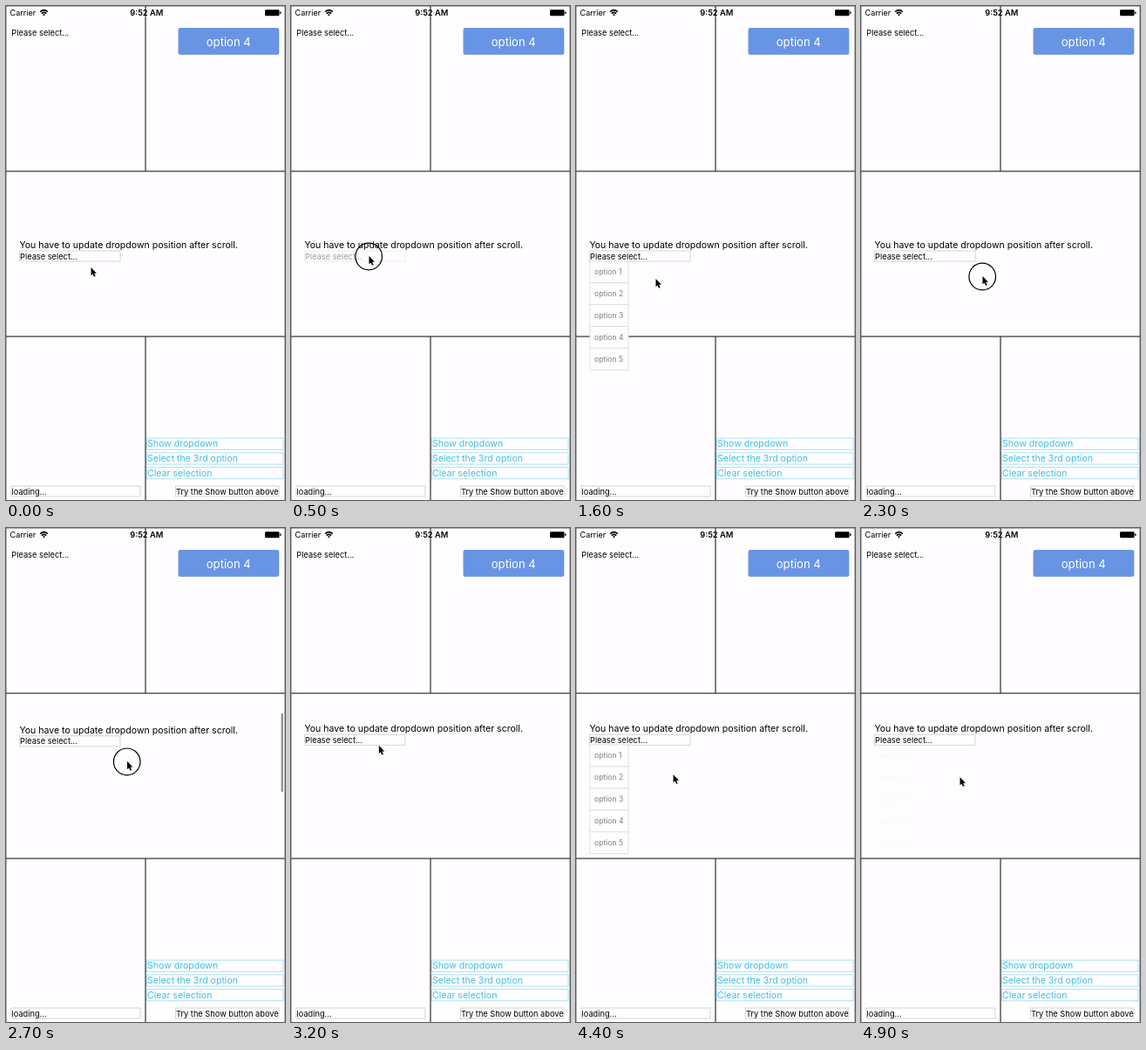
An HTML page for the animation above (5.1 s loop, 320x565 px).

```html
<!DOCTYPE html>
<html lang="en">
<head>
<meta charset="utf-8">
<title>Dropdown demo</title>
<style>
  html, body { margin: 0; width: 100%; height: 100%; overflow: hidden; background: #fffdff; }
  svg { display: block; width: 320px; height: 565px; font-family: Inter, "Open Sans", sans-serif; }
</style>
</head>
<body>
<svg id="stage" viewBox="0 0 320 565"></svg>
<script>
const LOOP = 5100, STEP = 100;
const W = 320, H = 565, ROW = 189;
const SMALL = 9.25, BODY = 10.55;
const stage = document.getElementById('stage');

const text = (x, y, size, str, fill = '#000', extra = '') =>
  `<text x="${x}" y="${y}" font-size="${size}" fill="${fill}" ${extra}>${str}</text>`;
const rect = (x, y, w, h, attrs = '') =>
  `<rect x="${x}" y="${y}" width="${w}" height="${h}" ${attrs}/>`;
const outline = (x, y, w, h, color = '#d3d3d3', fill = 'none') =>
  rect(x, y, w, h, `fill="${fill}" stroke="${color}" stroke-width=".9"`);
const field = (x, y, w, label) =>
  outline(x, y, w, 12) + text(x + .5, y + 9.6, SMALL, label);

const statusBar =
  text(4.5, 11.4, 9.1, 'Carrier') +
  text(W / 2 + 1.3, 11.4, 9.3, '9:52 AM', '#000', 'font-weight="600" text-anchor="middle"') +
  `<path d="M39.2 6.6Q43.5 2.6 47.8 6.6M40.8 8.6Q43.5 6.2 46.2 8.6" fill="none" stroke="#000" stroke-width="1.5"/>
   <path d="M42 9.8Q43.5 8.6 45 9.8L43.5 11.6Z"/>` +
  rect(297, 4.2, 16.5, 7, 'rx="1.2"') + rect(314.2, 6.3, 1.3, 2.8, 'rx=".6"');

// Two cells, one wide cell, two cells.
const grid = [2, 1, 2].map((count, row) => Array.from({ length: count }, (_, col) =>
  outline(col * W / count, row * ROW, W / count, ROW, '#4c4c4c')).join('')).join('');

const links = ['Show dropdown', 'Select the 3rd option', 'Clear selection'].map((label, i) => {
  const y = 494.2 + i * 16.7;
  return outline(161.5, y, 156.5, 13.2, '#9fe0f2') + text(162, y + 10.2, BODY, label, '#3fbfe2');
}).join('');

const options = Array.from({ length: 5 }, (_, i) => {
  const y = 291.7 + i * 24.9;
  return outline(16, y, 44, 24.9, '#dedede', '#fefefe') +
    text(21, y + 15.4, 8.6, `option ${i + 1}`, '#808080');
}).join('');

stage.innerHTML = grid + statusBar +
  text(6.3, 34.2, SMALL, 'Please select...') +
  rect(197.5, 25, 115.8, 30.8, 'rx="2.4" fill="#6894e4"') +
  text(255.3, 45.8, 13.1, 'option 4', '#fff', 'text-anchor="middle"') +
  links +
  field(6, 549, 148, 'loading...') +
  field(194.5, 549, 118.5, 'Try the Show button above') +
  `<g id="content">
     ${text(15.4, 276.8, BODY, 'You have to update dropdown position after scroll.')}
     <g id="select">${field(15.5, 280, 115.5, 'Please select...')}</g>
     <g id="list">${options}</g>
   </g>` +
  rect(315.6, 0, 2.3, 90, 'id="bar" rx="1.1" fill="#8f8f8f"') +
  `<g id="pointer">
     <circle id="touch" cx=".2" cy=".5" r="15.3" fill="none" stroke="#000" stroke-width="1.2"/>
     <path d="M.5 0V9.2L2.5 7.4L4 10.8L5.6 10.1L4.1 6.8H6.9Z" stroke="#fff" stroke-width=".6" paint-order="stroke"/>
   </g>`;

const [content, select, list, bar, pointer, touch] =
  ['content', 'select', 'list', 'bar', 'pointer', 'touch'].map(id => document.getElementById(id));

const ramp = (t, from, to) => Math.min(1, Math.max(0, (t - from) / (to - from)));
const smooth = k => k * k * (3 - 2 * k);
const pulse = (t, inFrom, inTo, outFrom, outTo) => ramp(t, inFrom, inTo) - ramp(t, outFrom, outTo);
const within = (t, from, to) => t >= from && t < to;

// Each dropdown is opened by a tap and closed by a second tap later.
const OPEN_TAPS = [400, 3500], CLOSE_DELAY = 1000, HOLD = 200;
const DRAG = { from: 2300, to: 2750, distance: 43.7 };
const HOME = { x: 97, y: 299 };
const MOVES = [
  { from: 0, to: 400, x: 89, y: 286 },
  { from: 700, to: 1300, x: 91, y: 312 },
  { from: 1700, to: 2200, x: 139, y: 309 },
  { from: DRAG.from, to: DRAG.to, x: 138.5, y: 309 - DRAG.distance },
  { from: 2800, to: 3400, x: 87, y: 243 },
  { from: 3900, to: 4500, x: 113, y: 285 },
];

function pointerAt(t) {
  return MOVES.reduce((p, m) => {
    const k = smooth(ramp(t, m.from, m.to));
    return { x: p.x + (m.x - p.x) * k, y: p.y + (m.y - p.y) * k };
  }, HOME);
}

function draw(now) {
  const t = Math.floor(now % LOOP / STEP) * STEP;
  const scroll = DRAG.distance * smooth(ramp(t, DRAG.from, DRAG.to));
  const { x, y } = pointerAt(t);
  let shown = 0, pressed = 0, touching = within(t, DRAG.from - 100, DRAG.to);

  for (const tap of OPEN_TAPS) {
    const close = tap + CLOSE_DELAY;
    pressed += pulse(t, tap - 100, tap + 100, tap + HOLD, tap + 400);
    shown += pulse(t, tap + 100, tap + 400, close + HOLD, close + 410);
    touching ||= within(t, tap, tap + HOLD) || within(t, close, close + HOLD);
  }

  content.setAttribute('transform', `translate(0 ${-scroll})`);
  select.setAttribute('opacity', 1 - .62 * pressed);
  list.setAttribute('opacity', shown);
  bar.setAttribute('y', 195 + scroll * .4);
  bar.setAttribute('opacity', pulse(t, DRAG.from, DRAG.from + 100, 2900, 3200));
  pointer.setAttribute('transform', `translate(${x} ${y})`);
  touch.setAttribute('opacity', touching ? 1 : 0);
}

function tick(now) {
  draw(now);
  requestAnimationFrame(tick);
}
draw(0);
requestAnimationFrame(tick);
</script>
</body>
</html>
```
